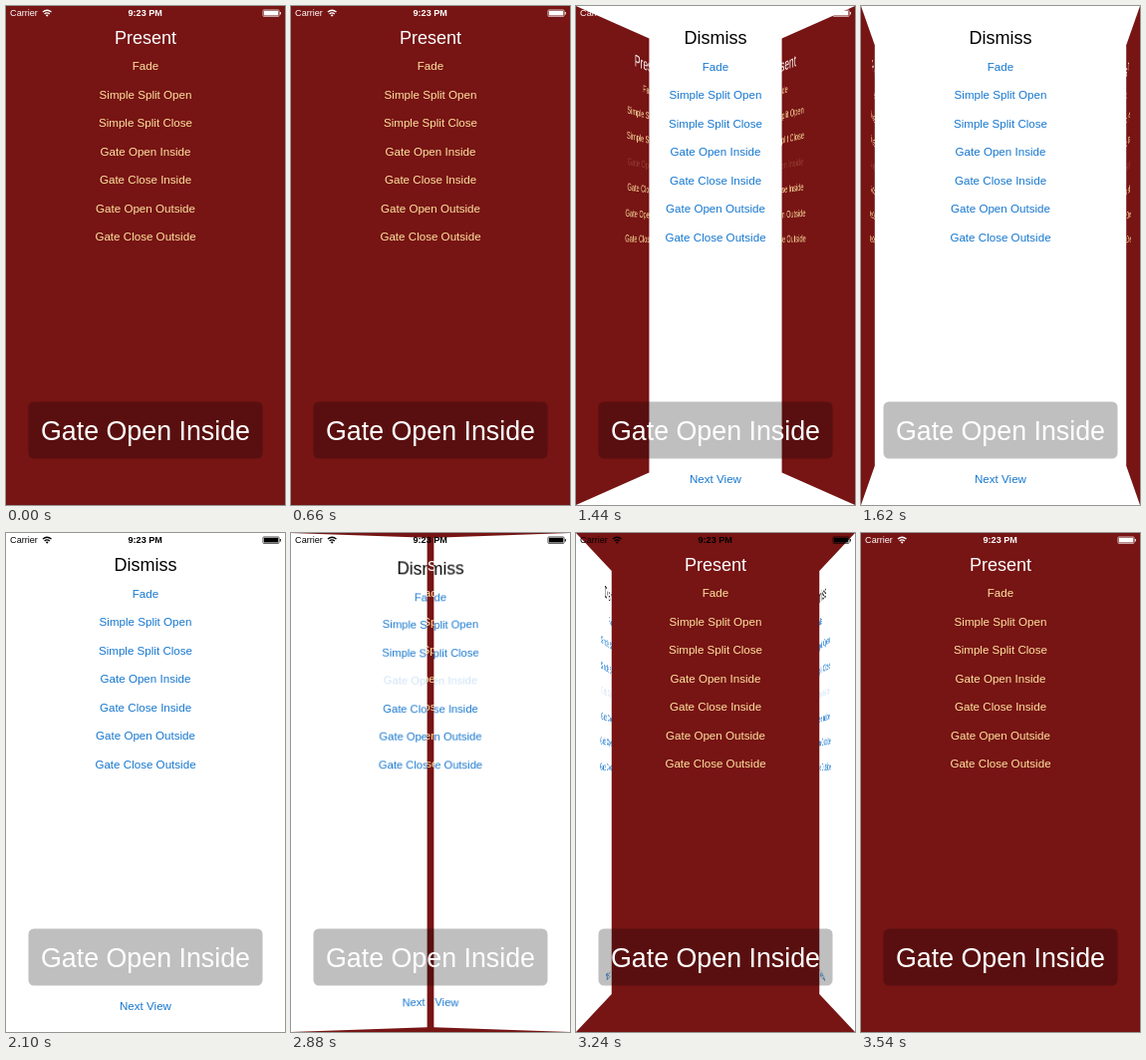
An HTML page for the animation above (3.6 s loop, 280 by 500 pixels).

```html
<!DOCTYPE html>
<html lang="en">
<head>
<meta charset="utf-8">
<title>Gate Open Inside</title>
<style>
  html, body { margin: 0; width: 100%; height: 100%; overflow: hidden; }
  #stage { position: relative; width: 280px; height: 500px; overflow: hidden; }
  svg { position: absolute; top: 0; left: 0; width: 280px; height: 500px; }
  text { font: 11.6px "Liberation Sans", Arial, sans-serif; text-anchor: middle; }
  .title { font-size: 18px; }
  .red { --page: #771414; --title: #fff; --item: #ffe3a0; }
  .white { --page: #fff; --title: #000; --item: #1677cf; }
  .page { fill: var(--page); }
  .title { fill: var(--title); }
  .item { fill: var(--item); }
  .tapped .target { opacity: .2; }
  .door { position: absolute; top: 0; width: 140px; height: 500px; overflow: hidden; }
  .left { left: 0; transform-origin: 0 50%; }
  .right { left: 140px; transform-origin: 100% 50%; }
  .right svg { left: -140px; }
  #status text { font-size: 9.1px; fill: currentColor; }
  #toast { font-size: 26.8px; fill: #fff; }
</style>
</head>
<body>
<div id="stage">
  <div id="scenes"></div>
  <svg viewBox="0 0 280 500">
    <rect x="22.5" y="396.5" width="235" height="57" rx="5.5" fill="#000" fill-opacity=".25"/>
    <text id="toast" x="140" y="435">Gate Open Inside</text>
    <g id="status">
      <text x="18" y="10.3">Carrier</text>
      <text x="139.7" y="10.3" style="font-weight:bold">9:23 PM</text>
      <g fill="none" stroke="currentColor" stroke-width="1.3">
        <path d="M36.9 6.1Q41.2 2.3 45.5 6.1M38.6 8Q41.2 5.8 43.8 8"/>
      </g>
      <path d="M39.8 9.1Q41.2 8 42.6 9.1L41.2 10.7Z" fill="currentColor"/>
      <rect x="257.9" y="3.9" width="16.2" height="6.6" rx="1" fill="none" stroke="currentColor" stroke-width=".6"/>
      <path d="M258.8 4.8h14.4v4.8h-14.4zM274.8 6h1v2.4h-1z" fill="currentColor"/>
    </g>
  </svg>
</div>
<script>
const LOOP = 3600, DURATION = 700, TAP_LEAD = 115;
const PRESENT = 1055, DISMISS = 2755;
const ITEMS = ['Fade', 'Simple Split Open', 'Simple Split Close', 'Gate Open Inside',
  'Gate Close Inside', 'Gate Open Outside', 'Gate Close Outside'];

function label(text, y, kind) {
  return `<text class="${kind}" x="140" y="${y}">${text}</text>`;
}

function view(color) {
  const white = color === 'white';
  const top = white ? 64.8 : 64.1;
  const items = ITEMS.map((name, i) =>
    label(name, top + i * 28.5, i === 3 ? 'item target' : 'item')).join('');
  return `<svg class="${color}" viewBox="0 0 280 500"><rect class="page" width="280" height="500"/>` +
    label(white ? 'Dismiss' : 'Present', 38.3, 'title') + items +
    (white ? label('Next View', 478.2, 'item') : '') + '</svg>';
}

function makeScene(front, back) {
  const scene = document.createElement('div');
  scene.innerHTML = view(back) +
    `<div class="door left">${view(front)}</div><div class="door right">${view(front)}</div>`;
  document.getElementById('scenes').append(scene);
  const [left, right] = scene.querySelectorAll('.door');
  return { scene, left, right };
}

const presenting = makeScene('red', 'white');
const dismissing = makeScene('white', 'red');
const status = document.getElementById('status');

// Standard ease-in-out: cubic-bezier(.42, 0, .58, 1)
function easeInOut(x) {
  if (x <= 0 || x >= 1) return x <= 0 ? 0 : 1;
  let s = x;
  for (let i = 0; i < 6; i++) {
    s -= (1.26 * s - .78 * s * s + .52 * s ** 3 - x) / (1.26 - 1.56 * s + 1.56 * s * s);
  }
  return s * s * (3 - 2 * s);
}

function pose({ scene, left, right }, visible, elapsed) {
  scene.style.display = visible ? '' : 'none';
  if (!visible) return;
  const angle = 90 * easeInOut(elapsed / DURATION);
  const turn = a => angle ? `perspective(747px) rotateY(${a}deg)` : 'none';
  left.style.transform = turn(angle);
  right.style.transform = turn(-angle);
  for (const door of [left, right]) door.classList.toggle('tapped', elapsed >= -TAP_LEAD);
}

function draw(now) {
  const t = now % LOOP;
  const onWhite = t >= PRESENT + DURATION && t < DISMISS + DURATION;
  pose(presenting, !onWhite, t < DISMISS ? t - PRESENT : -LOOP);
  pose(dismissing, onWhite, t - DISMISS);
  status.style.color = onWhite ? '#000' : '#fff';
}

const start = performance.now();
function tick() {
  draw(performance.now() - start);
  requestAnimationFrame(tick);
}
tick();
</script>
</body>
</html>
```
